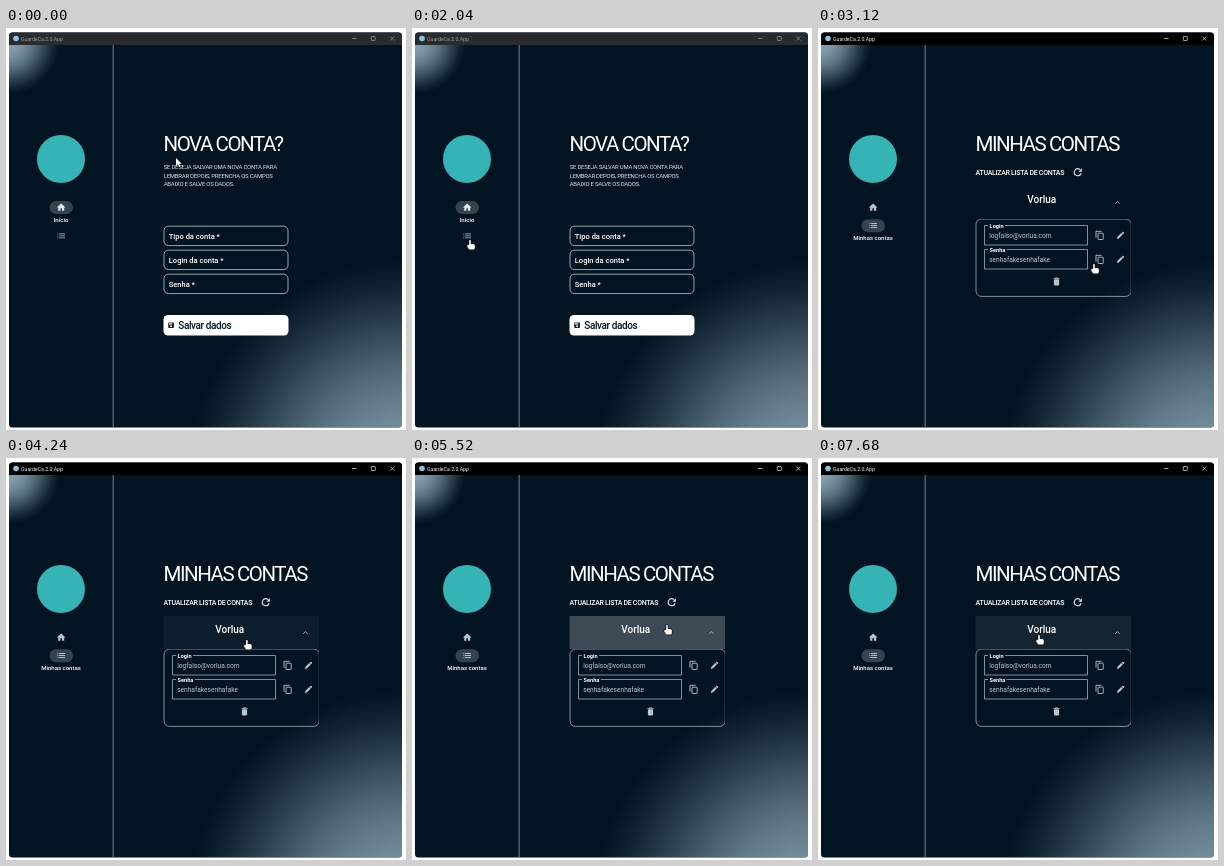
An HTML page with a canvas for the animation above (8000 ms loop, 400x402 px).

```html
<!DOCTYPE html>
<html lang="pt">
<head>
<meta charset="utf-8">
<title>Contas</title>
<style>
html, body { margin: 0; width: 100%; height: 100%; overflow: hidden; background: #fff; }
canvas { display: block; width: 400px; height: 402px; }
</style>
</head>
<body>
<canvas id="stage"></canvas>
<script>
const canvas = document.getElementById('stage');
const ctx = canvas.getContext('2d');
const W = 400, H = 402, LOOP = 8000;
const dpr = window.devicePixelRatio || 1;
canvas.width = W * dpr;
canvas.height = H * dpr;

const FONT = 'Roboto, "Open Sans", sans-serif';
const NAVY = '#021422', GREY = '#bcc4cb', EDGE = '#a4adb5';
const FOCUS_AT = 2120, SWAP_AT = 2160;
const TRIP = 500; // longest pointer move, ms

// Pointer stops: arrival time and tip position
const stops = [
  { t: 0, x: 170, y: 130 },
  { t: 900, x: 123, y: 225 },
  { t: 1880, x: 58, y: 212 },
  { t: 2700, x: 277, y: 208 },
  { t: 3080, x: 276, y: 236 },
  { t: 3760, x: 239, y: 250 },
  { t: 4320, x: 241, y: 177 },
  { t: 5240, x: 255, y: 167 },
  { t: 6150, x: 174, y: 220 },
  { t: 6440, x: 335, y: 360 },
  { t: 6740, x: 275, y: 246 },
  { t: 7120, x: 196, y: 200 },
  { t: 7560, x: 221, y: 186 },
  { t: 7660, x: 221, y: 177 }
];

const mix = (a, b, u) => a + (b - a) * u;

function ramp(t, from, to) {
  const u = Math.min(1, Math.max(0, (t - from) / (to - from)));
  return u * u * (3 - 2 * u);
}

function pointerAt(t) {
  let { x, y } = stops[0];
  for (let i = 1; i < stops.length; i++) {
    const stop = stops[i];
    const u = ramp(t, Math.max(stops[i - 1].t, stop.t - TRIP), stop.t);
    x = mix(x, stop.x, u);
    y = mix(y, stop.y, u);
  }
  return { x, y };
}

const openness = t => 1 - ramp(t, 4360, 4600) + ramp(t, 5180, 5460);
const headerTint = t =>
  0.18 * ramp(t, 4200, 4340) + 0.05 * ramp(t, 5120, 5240) - 0.16 * ramp(t, 5640, 5860);

function at(x, y, paint) {
  ctx.save();
  ctx.translate(x, y);
  paint();
  ctx.restore();
}

function text(str, x, y, size, { weight = 400, color = '#fff', spacing = 0, align = 'left' } = {}) {
  ctx.font = `${weight} ${size}px ${FONT}`;
  ctx.letterSpacing = spacing + 'px';
  ctx.textAlign = align;
  ctx.fillStyle = color;
  ctx.fillText(str, x, y);
}

function box(x, y, w, h, r, fill, stroke, line = 0.8) {
  ctx.beginPath();
  ctx.roundRect(x, y, w, h, r);
  if (fill) { ctx.fillStyle = fill; ctx.fill(); }
  if (stroke) { ctx.strokeStyle = stroke; ctx.lineWidth = line; ctx.stroke(); }
}

function disc(x, y, r, fill) {
  ctx.beginPath();
  ctx.arc(x, y, r, 0, 2 * Math.PI);
  ctx.fillStyle = fill;
  ctx.fill();
}

function lines(color, width, ...paths) {
  ctx.beginPath();
  for (const [first, ...rest] of paths) {
    ctx.moveTo(...first);
    rest.forEach(p => ctx.lineTo(...p));
  }
  ctx.strokeStyle = color;
  ctx.lineWidth = width;
  ctx.stroke();
}

function polygon(color, ...points) {
  ctx.beginPath();
  points.forEach(p => ctx.lineTo(...p));
  ctx.fillStyle = color;
  ctx.fill();
}

// Icons are drawn around their own centre
const icons = {
  home(c) {
    polygon(c, [0, -4], [4.3, 0], [-4.3, 0]);
    box(-3, -0.5, 2.2, 3.9, 0, c);
    box(0.8, -0.5, 2.2, 3.9, 0, c);
    box(-1, -0.5, 2, 1.4, 0, c);
  },
  list(c) {
    for (const y of [-2, 0, 2]) {
      box(-3.8, y - 0.4, 0.9, 0.9, 0, c);
      box(-2.1, y - 0.4, 5.9, 0.9, 0, c);
    }
  },
  save(c) {
    box(-2.8, -2.8, 5.6, 5.6, 0.7, c);
    box(-2.1, -2, 3.2, 1.3, 0, '#fff');
    disc(0, 1.1, 1, '#fff');
  },
  refresh(c) {
    ctx.beginPath();
    ctx.arc(0, 0, 3.5, 0.3, 5.5);
    ctx.strokeStyle = c;
    ctx.lineWidth = 1.1;
    ctx.stroke();
    polygon(c, [4, -4], [4, -0.5], [0.5, -0.5]);
  },
  copy(c) {
    box(-1.8, -2.3, 5.2, 6.3, 0.5, null, c, 0.9);
    lines(c, 0.9, [[-3.8, 2.2], [-3.8, -4.2], [1.8, -4.2]]);
  },
  edit(c) {
    ctx.rotate(-Math.PI / 4);
    box(-3.2, -1.1, 5.6, 2.2, 0, c);
    box(2.9, -1.1, 1.6, 2.2, 0.4, c);
    polygon(c, [-3.2, -1.1], [-3.2, 1.1], [-5, 0]);
  },
  trash(c) {
    box(-2.6, -2.1, 5.2, 6.1, 0.8, c);
    box(-3.1, -3.5, 6.2, 0.9, 0, c);
    box(-1.5, -4, 3, 0.9, 0, c);
  }
};
const icon = (name, x, y, color = GREY) => at(x, y, () => icons[name](color));

function glow(x, y, r, strength) {
  const g = ctx.createRadialGradient(x, y, 0, x, y, r);
  const steps = 8;
  for (let i = 0; i <= steps; i++) {
    const fade = Math.cos(i / steps * Math.PI / 2) ** 1.3;
    g.addColorStop(i / steps, `rgba(146,174,190,${strength * fade})`);
  }
  ctx.fillStyle = g;
  ctx.fillRect(3, 17, 393, 383);
}

function drawWindow(t) {
  const active = t >= FOCUS_AT;
  const ink = active ? '#f2f2f2' : '#9a9c9e';
  ctx.fillStyle = NAVY;
  ctx.fillRect(3, 4, 393, 396);
  glow(3, 15, 51, 0.9);
  glow(400, 450, 218, 0.85);
  ctx.fillStyle = active ? '#000' : '#2a2b2c';
  ctx.fillRect(3, 4, 393, 13);
  ctx.fillStyle = '#7e8d9a';
  ctx.fillRect(106.7, 17, 0.9, 383);

  disc(10, 10.5, 2.8, '#8fc3dc');
  text('GuardeCa.2.0.App', 15, 12.6, 5.2, { color: ink });
  at(348.3, 10.5, () => lines(ink, 0.7, [[-2.2, 0], [2.2, 0]]));
  at(367.3, 10.5, () => box(-2, -2, 4, 4, 0.6, null, ink, 0.7));
  at(386.3, 10.5, () => lines(ink, 0.7, [[-2, -2], [2, 2]], [[2, -2], [-2, 2]]));
}

function drawSidebar(second) {
  const pillY = second ? 191.2 : 173;
  disc(55, 131, 24, '#36b3b4');
  box(43.5, pillY, 23.5, 13, 6.5, '#36434f');
  icon('home', 55.2, 179.4, second ? GREY : '#e4e7ea');
  icon('list', 55.2, second ? 197.6 : 207.8, second ? '#e4e7ea' : GREY);
  text(second ? 'Minhas contas' : 'Início', 55, pillY + 21.1, 6, { weight: 500, align: 'center' });
}

const heading = str => text(str, 157.5, 122.8, 20.5, { spacing: -1.45 });

function drawForm() {
  heading('NOVA CONTA?');
  ['SE DESEJA SALVAR UMA NOVA CONTA PARA', 'LEMBRAR DEPOIS, PREENCHA OS CAMPOS', 'ABAIXO E SALVE OS DADOS.']
    .forEach((line, i) => text(line, 157.7, 141 + i * 8.7, 6, { spacing: -0.25, color: '#dfe3e7' }));
  ['Tipo da conta *', 'Login da conta *', 'Senha *'].forEach((label, i) => {
    const y = 198.2 + i * 24;
    box(158, y, 124, 19.4, 4.5, null, '#c3cad0');
    text(label, 162.8, y + 12.3, 7.5, { weight: 500 });
  });
  box(157.5, 287, 125, 20.5, 4.5, '#fff');
  icon('save', 165.1, 297.2, NAVY);
  text('Salvar dados', 172.3, 300.6, 10, { weight: 500, spacing: -0.4, color: NAVY });
}

function drawField(y, label, value) {
  text(label, 171.6, y + 2.2, 5.6, { weight: 700 });
  const notch = 173 + ctx.measureText(label).width;
  lines(EDGE, 0.8, [[170, y], [166.5, y], [166.5, y + 19.5], [269.5, y + 19.5], [269.5, y], [notch, y]]);
  text(value, 171.2, y + 12.1, 6.6, { color: GREY });
  icon('copy', 281.8, y + 10);
  icon('edit', 302.3, y + 10);
}

function drawPanel(top, height) {
  ctx.save();
  ctx.beginPath();
  ctx.rect(157, top, 155.8, height + 0.8);
  ctx.clip();
  box(158, top, 155.3, height - 0.6, 5.5, null, EDGE);
  ctx.translate(0, top - 191);
  drawField(197.5, 'Login', 'logfalso@vorlua.com');
  drawField(221.5, 'Senha', 'senhafakesenhafake');
  icon('trash', 238.5, 253.4);
  ctx.restore();
}

function drawAccounts(t) {
  heading('MINHAS CONTAS');
  text('ATUALIZAR LISTA DE CONTAS', 157.6, 146.5, 7, { weight: 500, spacing: -0.3 });
  icon('refresh', 259.8, 144.2, '#d3e6f5');

  const open = openness(t);
  const bottom = mix(178, 191, open);
  const middle = mix(168, 174.7, open);
  ctx.fillStyle = `rgba(255,255,255,${headerTint(t)})`;
  ctx.fillRect(157.5, 158, 155.5, bottom - 158);
  text('Vorlua', 223.7, middle, 10, { weight: 500, align: 'center' });
  const bend = mix(1.2, -1.2, open);
  at(299.4, middle, () => lines(GREY, 0.8, [[-2.2, -bend], [0, bend], [2.2, -bend]]));
  if (open > 0) drawPanel(bottom, 78 * open);
}

function isClickable(t, x, y) {
  if (t < SWAP_AT) return Math.abs(x - 55) < 13 && Math.abs(y - 208) < 8;
  if (x > 157 && x < 313 && y > 158 && y < mix(178, 191, openness(t))) return true;
  return [[281.8, 207.5], [281.8, 231.5], [302.3, 231.5], [238.5, 253.4]]
    .some(([cx, cy]) => Math.hypot(x - cx, y - cy) < 10);
}

function drawHand() {
  const parts = (fill, stroke) => {
    box(-0.8, 0, 1.6, 7, 0.8, fill, stroke, 1.4);
    box(-1.6, 4, 6.4, 5.6, 1.6, fill, stroke, 1.4);
    box(-2.8, 5, 2.4, 2.6, 1, fill, stroke, 1.4);
  };
  parts(null, '#10161d');
  parts('#fff');
}

function drawArrow() {
  polygon('#fff', [0, 0], [0, 8], [1.9, 6.3], [3.1, 9], [4.4, 8.4], [3.2, 5.8], [5.7, 5.8]);
}

function draw(t) {
  const { x, y } = pointerAt(t);
  const second = t >= SWAP_AT;
  ctx.setTransform(dpr, 0, 0, dpr, 0, 0);
  ctx.fillStyle = '#fff';
  ctx.fillRect(0, 0, W, H);
  ctx.save();
  ctx.beginPath();
  ctx.roundRect(3, 4.5, 393, 395, 3.5);
  ctx.clip();
  drawWindow(t);
  drawSidebar(second);
  if (second) drawAccounts(t);
  else drawForm();
  at(x, y, isClickable(t, x, y) ? drawHand : drawArrow);
  ctx.restore();
}

const start = performance.now();
function frame() {
  draw((performance.now() - start) % LOOP);
  requestAnimationFrame(frame);
}
frame();
</script>
</body>
</html>
```
